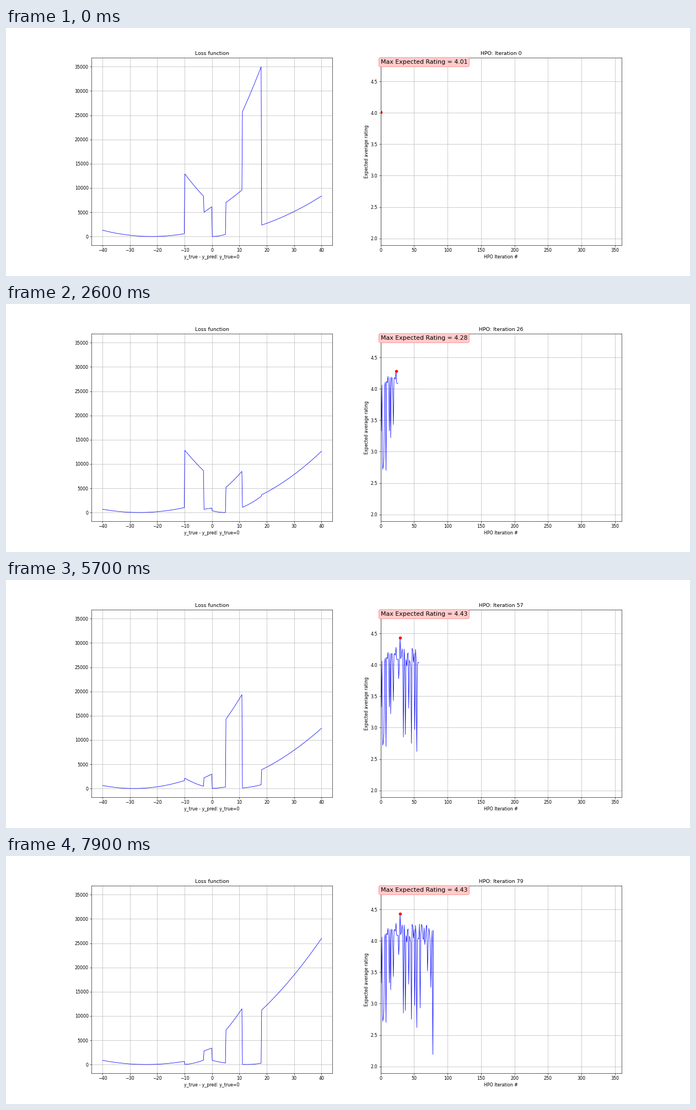
A matplotlib script that plays this animation: 1241 px wide and 451 px high, repeating every 8 s.

```python
import numpy as np
import matplotlib.pyplot as plt
from matplotlib.animation import FuncAnimation

W, H = 1241, 451
DPI = W / 22
FRAMES, INTERVAL = 80, 100

# Trials that set a new best, and trials that fail badly
BEST = {0: 4.01, 2: 4.06, 7: 4.11, 9: 4.12, 11: 4.20, 23: 4.28, 29: 4.43}
DIPS = {1: 3.33, 3: 2.72, 4: 2.77, 5: 2.90, 8: 2.70, 13: 3.33, 15: 3.22,
        19: 3.43, 27: 3.78, 34: 2.85, 37: 2.89, 42: 3.31, 46: 2.75,
        51: 2.97, 54: 2.62, 59: 2.93, 70: 3.52, 75: 3.26, 78: 2.19}


def make_ratings():
    """All other trials land a little below the best rating so far."""
    rng = np.random.default_rng(4)
    keys = BEST | DIPS
    ratings = []
    for n in range(FRAMES):
        usual = rng.uniform(3.9, 4.28)
        ratings.append(keys[n] if n in keys else min(usual, max(ratings) - 0.02))
    return np.array(ratings)


# The loss is one parabola (slope * (x - center))^2 per interval
BREAKS = [-10, -3, 0, 5, 11, 18]
FIRST_SLOPE = np.array([2, 3.29, 2.67, 4.24, 2.42, 3.9, 1.96])
FIRST_CENTER = np.array([-22, 24.6, -29.4, 0, -29.5, -30, -6.6])
LAST_SLOPE = np.array([1.83, 3.75, 1.87, 2.4, 3.95, 2.86, 2.53])
LAST_CENTER = np.array([-24, -11.1, -31.2, 12.2, -16.2, 12.4, -23.7])

x = np.linspace(-40, 40, 400)
piece = np.searchsorted(BREAKS, x, side="right")
ratings = make_ratings()


def loss(n):
    """Random trial that drifts from the first set of parabolas to the last."""
    u = n / (FRAMES - 1)
    spread = abs(np.sin(np.pi * u)) ** 0.3
    rng = np.random.default_rng(n)
    slope = FIRST_SLOPE + u * (LAST_SLOPE - FIRST_SLOPE)
    center = FIRST_CENTER + u * (LAST_CENTER - FIRST_CENTER)
    slope = slope + spread * rng.uniform(-0.9, 0.9, 7)
    center = np.clip(center + spread * rng.normal(0, 14, 7), -32, 28)
    return (slope[piece] * (x - center[piece])) ** 2


fig, (ax_loss, ax_hpo) = plt.subplots(1, 2, figsize=(W / DPI, H / DPI), dpi=DPI)
fig.subplots_adjust(left=0.125, right=0.9, bottom=0.125, top=0.88, wspace=0.2)

ax_loss.set(xlim=(-44, 44), ylim=(-1754, 36834), title="Loss function",
            xlabel="y_true - y_pred: y_true=0")
ax_hpo.set(xlim=(0, 360), ylim=(1.895, 4.878), xlabel="HPO Iteration #",
           ylabel="Expected average rating")
for ax in (ax_loss, ax_hpo):
    ax.grid(True)

loss_line, = ax_loss.plot([], [], color="blue", lw=1)
hpo_line, = ax_hpo.plot([], [], color="blue", lw=1)
best_dot, = ax_hpo.plot([], [], "ro")
title = ax_hpo.set_title("")
label = ax_hpo.text(0, 4.782, "", size=14,
                    bbox=dict(boxstyle="round", ec=(1, 0.5, 0.5), fc=(1, 0.8, 0.8)))


def update(n):
    seen = ratings[:n + 1]
    best = seen.argmax()
    loss_line.set_data(x, loss(n))
    hpo_line.set_data(np.arange(n + 1), seen)
    best_dot.set_data([best], [seen[best]])
    title.set_text(f"HPO: Iteration {n}")
    label.set_text(f"Max Expected Rating = {seen[best]:.2f}")
    return loss_line, hpo_line, best_dot, title, label


anim = FuncAnimation(fig, update, frames=FRAMES, interval=INTERVAL,
                     init_func=lambda: update(0), repeat=True, repeat_delay=0)
plt.show()
```
